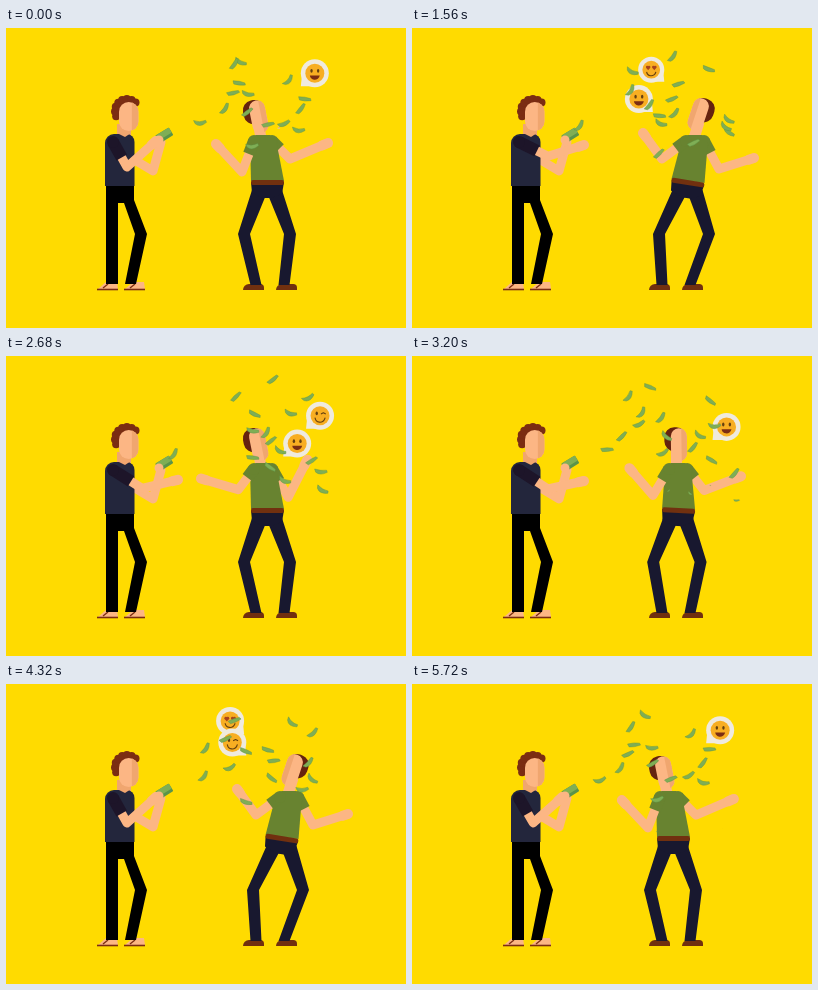
An HTML page with a canvas that plays this animation: 400x300 px, repeating every 5.76 s.

```html
<!DOCTYPE html>
<html lang="en">
<head>
<meta charset="utf-8">
<title>Money rain</title>
<style>
  html, body { margin: 0; width: 100%; height: 100%; overflow: hidden; background: #ffdb00; }
  canvas { display: block; }
</style>
</head>
<body>
<canvas id="stage" width="400" height="300"></canvas>
<script>
const ctx = document.getElementById('stage').getContext('2d');
const LOOP = 5760, SWAY = 2880, FLICK = 720, STEP = 40;
const SKIN = '#fcb684', SHADE = '#f0a66f', NAVY = '#23263c', PANTS = '#18182f';
const GREEN = '#7fae55', DARK_GREEN = '#5a934a', SHIRT = '#688330';
const BROWN = '#7b2d12', DARK_BROWN = '#65230f', BUBBLE = '#efeade', INK = '#65400f';

// Arm poses of the dancer: left elbow, left hand, right elbow, right hand
const ARMS_LEFT = [[236, 144], [210, 116], [284, 131], [322, 115]];
const ARMS_RIGHT = [[250, 131], [231, 105], [307, 141], [342, 130]];
const ARMS_REACH = [[232, 133], [194, 123], [282, 142], [300, 103]];

// Speech bubbles: birth, resting place, mood
const bubbles = [
  [500, 239, 41, 'love'], [1100, 209, 57, 'smile'], [2000, 324, 50, 'wink'],
  [2400, 320, 67, 'smile'], [3340, 223, 35, 'love'], [3750, 215, 45, 'wink'],
  [4840, 311, 42, 'smile'], [5740, 330, 38, 'wink']
];

const mod = (a, n) => ((a % n) + n) % n;
const clamp = (v, lo, hi) => Math.max(lo, Math.min(hi, v));
const mix = (a, b, k) => a + (b - a) * k;
const mixPoint = (a, b, k) => a.map((v, i) => mix(v, b[i], k));
const rand = n => mod(Math.sin(n * 127.1 + 11.7) * 43758.5453, 1);
const ramp = (t, from, to) => {
  const u = clamp((t - from) / (to - from), 0, 1);
  return u * u * (3 - 2 * u);
};
// Rises to 1, holds, and falls back to 0
const pulse = (t, up, top, hold, end) => ramp(t, up, top) - ramp(t, hold, end);
const leanAt = t => pulse(mod(t, SWAY), 0, 800, 1560, 2400);

function poly(color, ...pts) {
  ctx.fillStyle = color;
  ctx.beginPath();
  pts.forEach(p => ctx.lineTo(...p));
  ctx.fill();
}
function line(color, width, cap, ...pts) {
  ctx.strokeStyle = color;
  ctx.lineWidth = width;
  ctx.lineCap = cap;
  ctx.lineJoin = 'round';
  ctx.beginPath();
  pts.forEach(p => ctx.lineTo(...p));
  ctx.stroke();
}
function oval(color, x, y, rx, ry = rx) {
  ctx.fillStyle = color;
  ctx.beginPath();
  ctx.ellipse(x, y, rx, ry, 0, 0, 7);
  ctx.fill();
}
function box(color, x, y, w, h, r = 0) {
  ctx.fillStyle = color;
  ctx.beginPath();
  ctx.roundRect(x, y, w, h, r);
  ctx.fill();
}
function at(x, y, angle, scale, draw) {
  ctx.save();
  ctx.translate(x, y);
  ctx.rotate(angle);
  ctx.scale(scale, scale);
  draw();
  ctx.restore();
}
// Face with a darker strip on one side
function face(x, y, w, h, side) {
  ctx.save();
  box(SKIN, x, y, w, h, w / 2);
  ctx.clip();
  box(SHADE, side > 0 ? x + w * .66 : x, y, w * .34, h);
  ctx.restore();
}
function arm(shoulder, elbow, hand, sleeve, length) {
  const cuff = mixPoint(shoulder, elbow, length);
  line(SKIN, 9, 'round', cuff, elbow, hand);
  line(SKIN, 10, 'round', mixPoint(hand, elbow, .15), hand);
  line(sleeve, 12, 'butt', shoulder, cuff);
  oval(sleeve, ...shoulder, 6);
}
function leg(color, hip, knee, foot) {
  poly(color, [hip[0] - 8, hip[1]], [hip[0] + 8, hip[1]], [knee[0] + 6, knee[1]],
    [foot[0] + 5.5, foot[1]], [foot[0] - 5.5, foot[1]], [knee[0] - 6, knee[1]]);
}

function thrower(t) {
  const phase = mod(t, FLICK);
  const reach = pulse(phase, 0, 90, 540, 690), swing = pulse(phase, 70, 200, 480, 690);
  for (const x of [91, 118]) {
    poly(SKIN, [x + 9, 254], [x + 20, 254], [x + 21, 261], [x + 1, 261]);
    line(BROWN, 1.6, 'butt', [x, 261.5], [x + 21, 261.5]);
    line(BROWN, 1.4, 'butt', [x + 6, 260], [x + 11, 256]);
  }
  box('#000', 100, 156, 12, 100);
  poly('#000', [100, 156], [128, 156], [128, 172], [141, 206], [130, 256], [119, 256],
    [129, 206], [118, 175], [100, 175]);
  line(SKIN, 9, 'round', [122, 128], [147, 143], [155, 114]);
  box(SHADE, 111, 96, 14, 13);
  box(NAVY, 99, 106, 29.5, 52, [9, 8, 0, 0]);
  poly(SHADE, [111, 105], [125, 105], [119, 109]);
  box(BROWN, 109, 73, 20, 16, 5);
  for (let a = 2.7; a < 5.6; a += .4) oval(BROWN, 121 + 12 * Math.cos(a), 83 + 12 * Math.sin(a), 4);
  face(113, 74, 19.5, 29, 1);
  at(158, 107, -.55, 1, () => {
    box(DARK_GREEN, -8, -4, 16, 9, 1);
    box(GREEN, -7, -4, 15, 6, 1);
  });
  oval(SKIN, 153, 112, 4.5);
  arm([107, 114], [121 + 15 * reach, 139 - 13 * reach + 7 * swing],
    [150 + 22 * reach, 113 + 12 * swing], '#1d1529', .62);
}

function dancer(t) {
  const lean = leanAt(t), reach = pulse(mod(t, SWAY), 2150, 2600, 2650, 2850);
  const hip = mix(261, 275.5, lean), chest = mix(257, 283, lean);
  const tilt = .16 * lean;
  const [elbowL, handL, elbowR, handR] = ARMS_LEFT.map((p, i) =>
    mixPoint(mixPoint(p, ARMS_RIGHT[i], lean), ARMS_REACH[i], reach));

  for (const x of [237, 270]) box('#71300f', x, 256, 21, 6, [8, 5, 0, 0]);
  leg(PANTS, [hip - 7, 162], [mix(238, 247, lean), 206], [250, 257]);
  leg(PANTS, [hip + 7, 162], [mix(284, 297, lean), 206], [278, 257]);
  at(hip, 154, tilt, 1, () => poly(PANTS, [-16, 0], [17, 0], [15, 12], [5, 16], [-4, 16], [-15, 11]));

  arm([chest + 9, 113], elbowR, handR, SHIRT, .42);
  line(SKIN, 11, 'butt', [mix(255, 282, lean), 110], [mix(252, 287, lean), 94]);
  poly(SHIRT, [chest - 13, 111], [chest - 7, 107], [chest + 7, 107], [chest + 13, 112],
    [hip + 17, 153 + 2 * lean], [hip - 16, 153 - 2 * lean]);
  at(hip, 154, tilt, 1, () => box('#71300f', -16, -2, 33, 5, 2));
  arm([chest - 9, 113], elbowL, handL, SHIRT, .42);

  const turn = clamp((.65 - lean) * 6, -1, 1);
  at(mix(249, 290, lean), 88 - 2 * lean, mix(-.2, .32, lean), 1, () => {
    box(DARK_BROWN, -11, -16, 22, 24, 10);
    face(-8 + 3.5 * turn, -15, 16, 33, turn);
  });
}

function bubble([birth, endX, endY, mood], t) {
  const life = 1200, age = mod(t - birth, LOOP);
  if (age >= life) return;
  const left = leanAt(birth) > .57;
  const p = 1 - (1 - age / life) ** 2, side = left ? 1 : -1;
  const size = Math.min(1, age / 250, (life - age) / 150);
  at(mix(left ? 256 : 271, endX, p), mix(left ? 94 : 102, endY, p), 0, size, () => {
    oval(BUBBLE, 0, 0, 14);
    poly(BUBBLE, [side * 13, 3], [side * 14, 13], [side * 3, 13]);
    oval('#f8ae22', 0, 0, 9.5);
    for (const x of [-3.3, 3.3]) {
      if (mood === 'love') {
        for (const lobe of [-1, 1]) oval('#a8431c', x + lobe, -2.8, 1.4);
        poly('#a8431c', [x - 2.3, -2.3], [x + 2.3, -2.3], [x, .6]);
      } else if (mood === 'wink' && x > 0) {
        line(INK, 1.2, 'round', [x - 2, -2], [x, -3], [x + 2, -2]);
      } else oval(INK, x, -2.4, 1.2, 1.9);
    }
    ctx.beginPath();
    ctx.arc(0, 1.5, 5, .15, Math.PI - .15);
    if (mood === 'smile') {
      ctx.fillStyle = BROWN;
      ctx.fill();
    } else {
      ctx.strokeStyle = INK;
      ctx.lineWidth = 1.2;
      ctx.stroke();
    }
  });
}

function note(x, y, angle, size, bend) {
  at(x, y, angle, size, () => {
    ctx.beginPath();
    ctx.moveTo(-6.5, -1.5);
    ctx.quadraticCurveTo(0, bend - 1, 5.5, -2);
    ctx.lineTo(6.5, 0);
    ctx.quadraticCurveTo(0, bend + 4, -5, 1.5);
    ctx.closePath();
    ctx.fillStyle = GREEN;
    ctx.fill();
    ctx.strokeStyle = DARK_GREEN;
    ctx.lineWidth = .4;
    ctx.stroke();
  });
}

// Every flick throws two fans of five notes, slowed by the air
function notes(t) {
  const life = 1250;
  for (let i = 0; i < LOOP / FLICK * 10; i++) {
    const j = i % 5, burst = Math.floor(i / 5);
    const start = Math.floor(burst / 2) * FLICK + (burst % 2 ? 510 : 110) + (4 - j) * 14;
    const age = mod(t - start, LOOP);
    if (age >= life) continue;
    const s = age / 1000, rise = (j + rand(i) * .6) / 4.6;
    const x = 165 + (80 + 95 * rand(i + 200)) * (1 - Math.exp(-s / .35));
    const y = 103 - (15 + 95 * rise) * (1 - Math.exp(-s / .2)) + (40 + 45 * rise) * s * s;
    const flutter = .8 * Math.sin(s * 5 + rand(i + 400) * 6.3) * Math.min(1, s * 4);
    note(x, y, flutter - Math.exp(-s / .2), Math.min(1, (life - age) / 120), 2 * Math.cos(s * 4 + i));
  }
}

function frame(now) {
  const t = Math.floor(mod(now - begin, LOOP) / STEP) * STEP;
  ctx.fillStyle = '#ffdb00';
  ctx.fillRect(0, 0, 400, 300);
  thrower(t);
  dancer(t);
  bubbles.forEach(b => bubble(b, t));
  notes(t);
  requestAnimationFrame(frame);
}
const begin = performance.now();
frame(begin);
</script>
</body>
</html>
```
